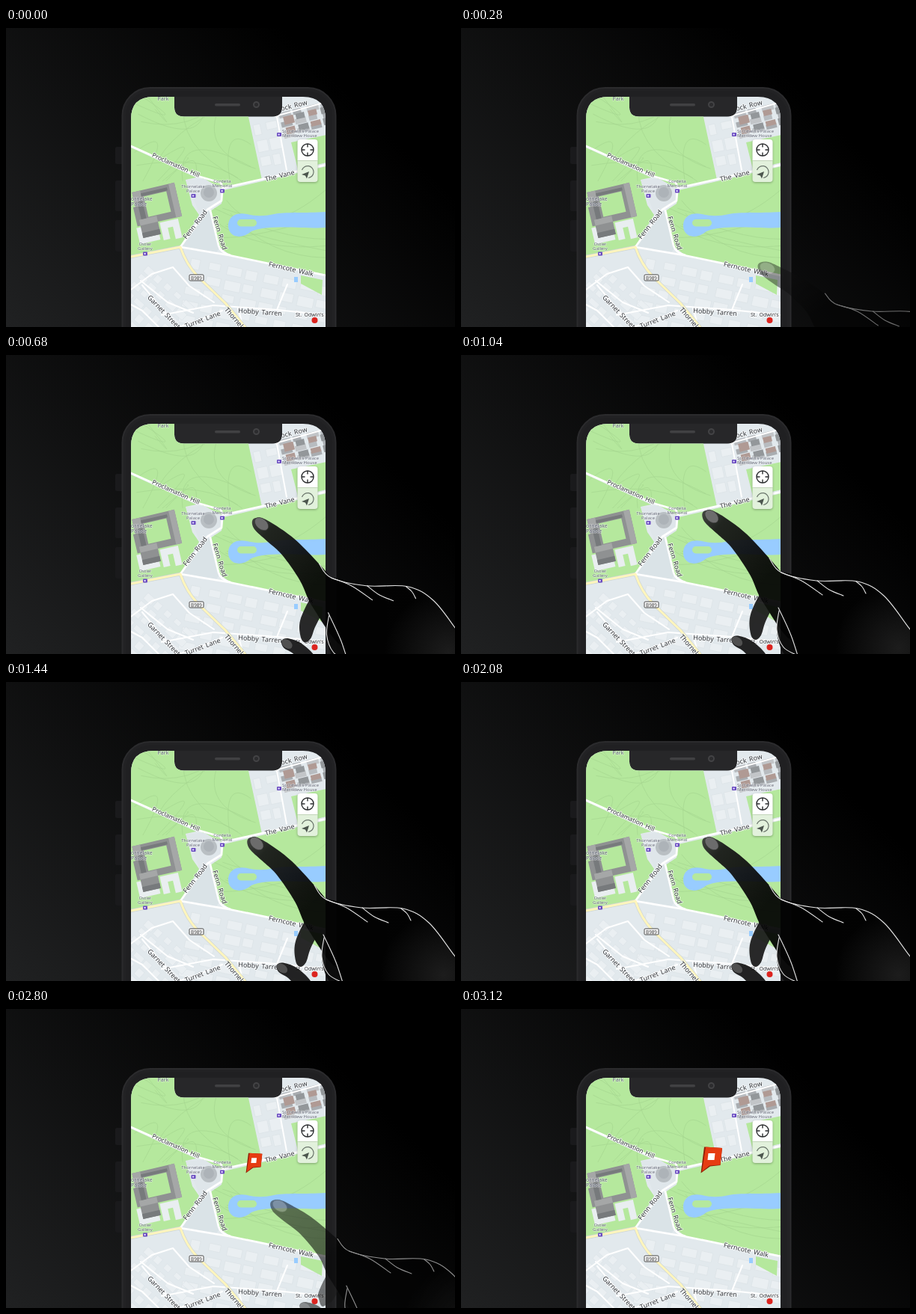
Animation of 600x400 px, one loop 4000 ms. Source, as an HTML page:

```html
<!DOCTYPE html>
<html lang="en">
<head>
<meta charset="utf-8">
<title>Drop a pin on the map</title>
<style>
html, body { margin: 0; width: 100%; height: 100%; overflow: hidden; background: #000; }
svg { display: block; width: 600px; height: 400px; }
text { font-family: "Noto Sans", "Open Sans", sans-serif; paint-order: stroke; stroke-linejoin: round; }
.street { word-spacing: 1.5px; fill: #2f3338; stroke: #fff; stroke-opacity: .75; stroke-width: 1.8px; }
.place { fill: #5a6070; stroke: #fff; stroke-opacity: .55; stroke-width: 1.2px; }
.road { fill: none; stroke: #fff; stroke-linejoin: round; stroke-linecap: round; }
.line { fill: none; stroke: #e4e4e4; stroke-width: 1.1; stroke-linecap: round; }
</style>
</head>
<body>
<svg viewBox="0 0 600 400">
  <defs>
    <linearGradient id="back" gradientUnits="userSpaceOnUse" x1="0" y1="400" x2="385" y2="15">
      <stop offset="0" stop-color="#202122"/><stop offset="1" stop-color="#000"/>
    </linearGradient>
    <linearGradient id="skin" gradientUnits="userSpaceOnUse" x1="322" y1="207" x2="415" y2="290">
      <stop offset="0" stop-color="#3c3c3c"/><stop offset=".25" stop-color="#161616"/><stop offset="1" stop-color="#020202"/>
    </linearGradient>
    <radialGradient id="palmGlow" gradientUnits="userSpaceOnUse" cx="585" cy="392" r="85">
      <stop offset="0" stop-color="#1e1e1e"/><stop offset="1" stop-color="#020202"/>
    </radialGradient>
    <clipPath id="screen">
      <path d="M167 400V122Q167 92 197 92H225V106Q225 118.500 238 118.500H356Q369 118.500 369 106V92H397Q427 92 427 122V400Z"/>
    </clipPath>
    <clipPath id="inPark"><use href="#park"/></clipPath>
  </defs>

  <rect width="600" height="400" fill="url(#back)"/>

  <g fill="#1a1a1c">
    <rect x="146" y="159" width="12" height="23" rx="2"/>
    <rect x="146" y="204" width="12" height="41" rx="2"/>
    <rect x="146" y="257" width="12" height="42" rx="2"/>
  </g>
  <rect x="155.500" y="80" width="285" height="360" rx="37" fill="#222224" stroke="#2b2b2d" stroke-width="2"/>
  <rect x="160" y="84.500" width="276" height="360" rx="33" fill="#202022"/>
  <path d="M220 92H374V119H220Z" fill="#272729"/>
  <rect x="279" y="101" width="34" height="3.500" rx="1.700" fill="#414143"/>
  <circle cx="334.500" cy="102.500" r="3.500" fill="#2c2c2e" stroke="#434345" stroke-width="2"/>

  <g clip-path="url(#screen)">
    <rect x="167" y="92" width="261" height="308" fill="#e2e9ed"/>
    <g id="blocks" fill="#eaeff2" stroke="#d8e0e4" stroke-width=".5"></g>
    <path id="park" fill="#b5e89d" d="M167 92H319L324 119L342 203L288 214L256 198L167 158Z
      M167 160L254 200L240 203L249 237L258 250L233 292L167 304Z
      M291 217L428 185V330L300 304L286 294L273 245L288 235Z
      M381 153L428 143V180L390 189Z M394 331L423 337L422 357L394 342Z"/>
    <g id="paths" clip-path="url(#inPark)" fill="none" stroke="#9ccb88" stroke-width=".6" opacity=".7"></g>

    <path d="M297 263C298 251 309 246 322 249S344 252 358 249S401 248 428 246V267C402 269 350 262 328 272C314 284 296 280 297 263Z" fill="#98ccff"/>
    <rect x="309" y="256" width="26" height="9.500" rx="4.700" fill="#b5e89d"/>
    <rect x="385" y="333" width="5" height="7" fill="#98ccff"/>

    <path d="M240 203L266 202L289 216L287 235L268 243L259 250Z" fill="#dfe6ea"/>
    <path d="M268 245L273 246L286 294L281 300L234 292Z" fill="#dae3e7"/>

    <g transform="translate(201 237) rotate(-13)">
      <path d="M-33 24H-5V46H-33ZM-1 24H24V50H15V33H8V48H-1Z" fill="#e9eef0"/>
      <path d="M-28 -24H30V22H-3V39H-27V22H-31V-4H-28Z" fill="#8f9192"/>
      <path d="M22 -24H30V22H22ZM-28 -24H-17V-10H-28ZM-27 14H-3V22H-27Z" fill="#a5a7a7"/>
      <path d="M-17 -20H19V-16H-17ZM-24 -10H-17V14H-24ZM-27 32H-3V39H-27Z" fill="#777a7c"/>
      <rect x="-14" y="-15" width="31" height="28" fill="#b5e89d"/>
    </g>
    <circle cx="271" cy="221" r="11" fill="#b9bfc3"/>
    <circle cx="271" cy="220" r="7" fill="#adb3b8"/>
    <g id="town"></g>

    <g class="road" stroke-width="2">
      <path d="M167 350L195 329L223 320L245 345L278 367M180 338L216 367L250 381M167 370L182 378L204 400"/>
      <path d="M208 384L277 371L362 377L428 384M310 374L317 400M362 377L376 343"/>
      <path d="M360 118L428 99M362 119L375 190M182 344L232 404M222 402Q248 396 289 378"/>
    </g>
    <path class="road" style="stroke:#cdd6d5" stroke-width="4.400" d="M167 306L233 293Q242 320 262 338L293 368L321 402"/>
    <g class="road" stroke-width="2.700">
      <path d="M167 158L256 198L287 207L290 214L428 183"/>
      <path d="M289 215L288 231L269 243L233 293L298 304L428 331M273 244L284 291Q286 300 300 304"/>
    </g>
    <path class="road" style="stroke:#fff5bd" stroke-width="3.100" d="M167 306L233 293Q242 320 262 338L293 368L321 402"/>

    <g id="labels"></g>
    <rect x="245" y="330" width="19" height="8" rx="1.200" fill="#fff" stroke="#444"/>
    <text x="254.500" y="336.700" text-anchor="middle" font-size="6.300" fill="#333">B989</text>
    <circle cx="412.500" cy="391" r="4" fill="#dc241f"/>

    <g filter="drop-shadow(0 1px 1.500px rgba(0,0,0,.3))">
      <path d="M389.500 177.500V153Q389.500 149 393.500 149H412.500Q416.500 149 416.500 153V177.500Z" fill="#fff"/>
      <path d="M389.500 178V202Q389.500 206 393.500 206H412.500Q416.500 206 416.500 202V178Z" fill="#e2f1dc"/>
    </g>
    <g fill="none" stroke="#2c2e30" stroke-width="1.400">
      <circle cx="403" cy="163" r="8"/>
      <path d="M403 155V159.500M403 166.500V171M395 163H399.500M406.500 163H411"/>
    </g>
    <path d="M395.500 190A8 8 0 1 1 404 200.500" fill="none" stroke="#6b766c" stroke-width="1.200"/>
    <path d="M395 196L405 192L402 201.500L400 197.500Z" fill="#4c564e"/>
  </g>

  <g id="pin">
    <path d="M325 184.500L349 186L346.500 209L333 210.500L320.500 219.500Z" fill="#8c1f08"/>
    <path d="M327 184.500L349 186L346.500 208.500L332 209.500L322 217.500Z" fill="#e63c12"/>
    <path d="M330.500 193L339.500 193L338.500 202L329.500 202Z" fill="#fff"/>
  </g>

  <g id="hand">
    <g opacity=".93">
      <path id="thumb" fill="#141414"/>
      <path id="ring" fill="#0b0b0b"/>
      <path id="middle" fill="#1a1a1a"/>
      <path id="palm" fill="url(#palmGlow)"/>
      <path id="index" fill="url(#skin)"/>
    </g>
    <ellipse id="indexNail" rx="10.500" ry="7" fill="#6c6c6c" stroke="#333" stroke-width=".6"/>
    <ellipse id="thumbNail" rx="8" ry="5.500" fill="#505050"/>
    <g class="line"><path id="back1"/><path id="back2"/><path id="back3"/><path id="back4"/><path id="heel"/><path id="ringEdge"/></g>
  </g>
</svg>
<script>
const $ = id => document.getElementById(id);
const clamp = (v, a = 0, b = 1) => Math.min(b, Math.max(a, v));

function add(parent, tag, attrs, text) {
  const el = document.createElementNS("http://www.w3.org/2000/svg", tag);
  for (const key in attrs) el.setAttribute(key, attrs[key]);
  if (text) el.textContent = text;
  $(parent).append(el);
}

let seed = 7;
function rand(a, b) {
  seed = (seed * 16807) % 2147483647;
  return a + (b - a) * seed / 2147483647;
}

// rows of houses on a tilted grid
function houses(parent, x0, y0, cols, rows, stepX, stepY, angle, fill) {
  for (let i = 0; i < cols * rows; i++) {
    const w = stepX * rand(.5, .9), h = stepY * rand(.45, .75);
    add(parent, "rect", {
      x: (i % cols) * stepX, y: Math.floor(i / cols) * stepY, width: w, height: h,
      transform: `translate(${x0} ${y0}) rotate(${angle})`, ...fill && { fill: fill(i) }
    });
  }
}
houses("blocks", 248, 308, 8, 5, 25, 19, 12);
houses("blocks", 190, 318, 5, 6, 17, 14, 42);
houses("blocks", 330, 130, 2, 3, 17, 22, -12);
houses("town", 364, 114, 4, 3, 19, 13, -14, i => ["#b8bcc0", "#a9adb1", "#c2c5c8"][i % 3]);
houses("town", 370, 119, 4, 2, 17, 15, -14, i => i % 2 ? "#93979a" : "#b09a94");

// footpaths
for (let i = 0; i < 22; i++) {
  const x = rand(170, 330), y = i % 2 ? 92 : 205;
  const left = i < 14;
  add("paths", "path", {
    d: left ? `M${x} ${y}Q${rand(220, 290)} ${rand(120, 170)} ${rand(170, 340)} ${rand(100, 210)}`
      : `M${rand(275, 300)} ${rand(215, 290)}Q${rand(330, 370)} ${rand(215, 310)} 428 ${rand(205, 310)}`
  });
}

function street(text, x, y, angle, size = 9) {
  add("labels", "text", { class: "street", "font-size": size, transform: `translate(${x} ${y}) rotate(${angle})` }, text);
}
function place(text, x, y, anchor = "middle", size = 6) {
  text.split("|").forEach((line, i) =>
    add("labels", "text", { class: "place", "font-size": size, x, y: y + i * (size + .4), "text-anchor": anchor }, line));
}
function landmark(x, y) {
  add("labels", "rect", { x: x - 3, y: y - 2.5, width: 6, height: 5, rx: 1, fill: "#6a4bc0" });
  add("labels", "rect", { x: x - 1.5, y: y - 1, width: 2.2, height: 2, fill: "#e4dcff" });
}

street("Proclamation Hill", 194.5, 172, 24, 8.4);
street("The Vane", 347, 205.5, -14);
street("Fenn Road", 241, 283, -52);
street("Fenn Road", 276, 253, 73);
street("Ferncote Walk", 350.5, 318.5, 13);
street("Hobby Tarren", 310, 381, 4);
street("Turret Lane", 240.5, 402, -21);
street("Garnet Street", 188.5, 361, 46);
street("Thornelake", 291.5, 377, 49);
street("ock Row", 368, 111, -14);
street("St. Odwin's Park", 387, 386, 0, 7);
place("Park", 210, 97.3, "middle", 7);
place("Thornelake|Palace", 250, 213.5);
place("Cordelia|Memorial", 289, 207);
place("Ostler|Gallery", 186, 291);
place("ornelake|Palace", 167, 231, "start", 7);
place("St Odwin's Palace|Merridew House", 369, 140, "start");
landmark(250.5, 224.5);
landmark(289, 218);
landmark(186, 302);
landmark(365, 142.5);

// fingers: spine points as x, y, half width
const fingers = {
  index: [[330.5, 215.5, 9], [350, 230, 12], [372, 249, 13.5], [400, 284, 17], [422, 319, 22], [462, 370, 22]],
  middle: [[394, 374, 7], [397, 352, 11], [412, 322, 12], [430, 300, 12]],
  ring: [[438, 394, 9], [431, 368, 9], [440, 340, 11]],
  thumb: [[368, 382, 7], [385, 391, 9], [403, 414, 11], [430, 480, 14]]
};
const palm = [[428, 291], [475, 302], [530, 303], [565, 322], [600, 367], [720, 520], [480, 520], [449, 400], [430, 345], [415, 310]];
const lines = {
  back1: [[412, 272], [428, 291], [475, 302], [530, 303], [565, 322], [600, 367], [640, 420]],
  back2: [[428, 291], [455, 302], [483, 321]],
  back3: [[476, 302], [492, 314], [511, 322]],
  back4: [[528, 303], [536, 310], [541, 319]],
  heel: [[424, 338], [441, 375], [453, 412]],
  ringEdge: [[425, 342], [422, 368], [431, 391], [450, 402]]
};

// smooth curve through the points
function curve(pts, closed) {
  const n = pts.length;
  const at = i => closed ? pts[(i + n) % n] : pts[clamp(i, 0, n - 1)];
  let d = "M" + pts[0];
  for (let i = 0; i < (closed ? n : n - 1); i++) {
    const [a, b, c, e] = [at(i - 1), at(i), at(i + 1), at(i + 2)];
    d += "C" + [0, 1].map(j => b[j] + (c[j] - a[j]) / 6)
      + " " + [0, 1].map(j => c[j] - (e[j] - b[j]) / 6) + " " + c;
  }
  return d + (closed ? "Z" : "");
}

// outline around a spine, rounded at its first point
function limb(spine) {
  const left = [], right = [];
  spine.forEach(([x, y, r], i) => {
    const a = spine[Math.max(i - 1, 0)], b = spine[Math.min(i + 1, spine.length - 1)];
    const len = Math.hypot(b[0] - a[0], b[1] - a[1]);
    const ux = (b[0] - a[0]) / len, uy = (b[1] - a[1]) / len;
    if (!i) left.push([x - ux * r, y - uy * r]);
    left.push([x + uy * r, y - ux * r]);
    right.unshift([x - uy * r, y + ux * r]);
  });
  return curve([...left, ...right], true);
}

// while the hand is away the index finger drops and the thumb lags
function bend([x, y, r], k) {
  const drop = clamp((440 - x) / 100) * clamp((345 - y) / 95);
  const lag = clamp((425 - x) / 30) * clamp((y - 350) / 25);
  const p = [x, y + k * (14 * drop - 14 * lag)];
  return r ? [...p, r] : p;
}

function drawHand(away, alpha) {
  $("hand").setAttribute("opacity", alpha);
  if (!alpha) return;
  $("hand").setAttribute("transform", `translate(${28 * away} ${29 * away})`);
  const k = Math.min(away, 2);
  const bent = pts => pts.map(p => bend(p, k));
  for (const id in fingers) $(id).setAttribute("d", limb(bent(fingers[id])));
  for (const id in lines) $(id).setAttribute("d", curve(bent(lines[id])));
  $("palm").setAttribute("d", curve(bent(palm), true));
  const nail = (id, x, y, angle) =>
    $(id).setAttribute("transform", `translate(${bend([x, y], k)}) rotate(${angle})`);
  nail("indexNail", 335, 216, 42 - 10 * k);
  nail("thumbNail", 369, 383, 38);
}

const FAR = 4.85;
const inOut = u => u < .5 ? 4 * u ** 3 : 1 - (2 - 2 * u) ** 3 / 2;

function draw(t) {
  const leave = clamp((t - 2600) / 520);
  const away = FAR * (t < 2600 ? (1 - clamp((t - 120) / 880)) ** 3 : inOut(leave));
  drawHand(away, t < 2600 ? clamp((t - 100) / 390) : 1 - leave);

  const grow = 1 - (1 - leave) ** 3;
  $("pin").setAttribute("transform", `translate(320.5 219.5) scale(${grow}) translate(-320.5 -219.5)`);
}

let start;
function tick(now) {
  start ??= now;
  draw(Math.floor((now - start) % 4000 / 40) * 40);
  requestAnimationFrame(tick);
}
draw(0);
requestAnimationFrame(tick);
</script>
</body>
</html>
```
